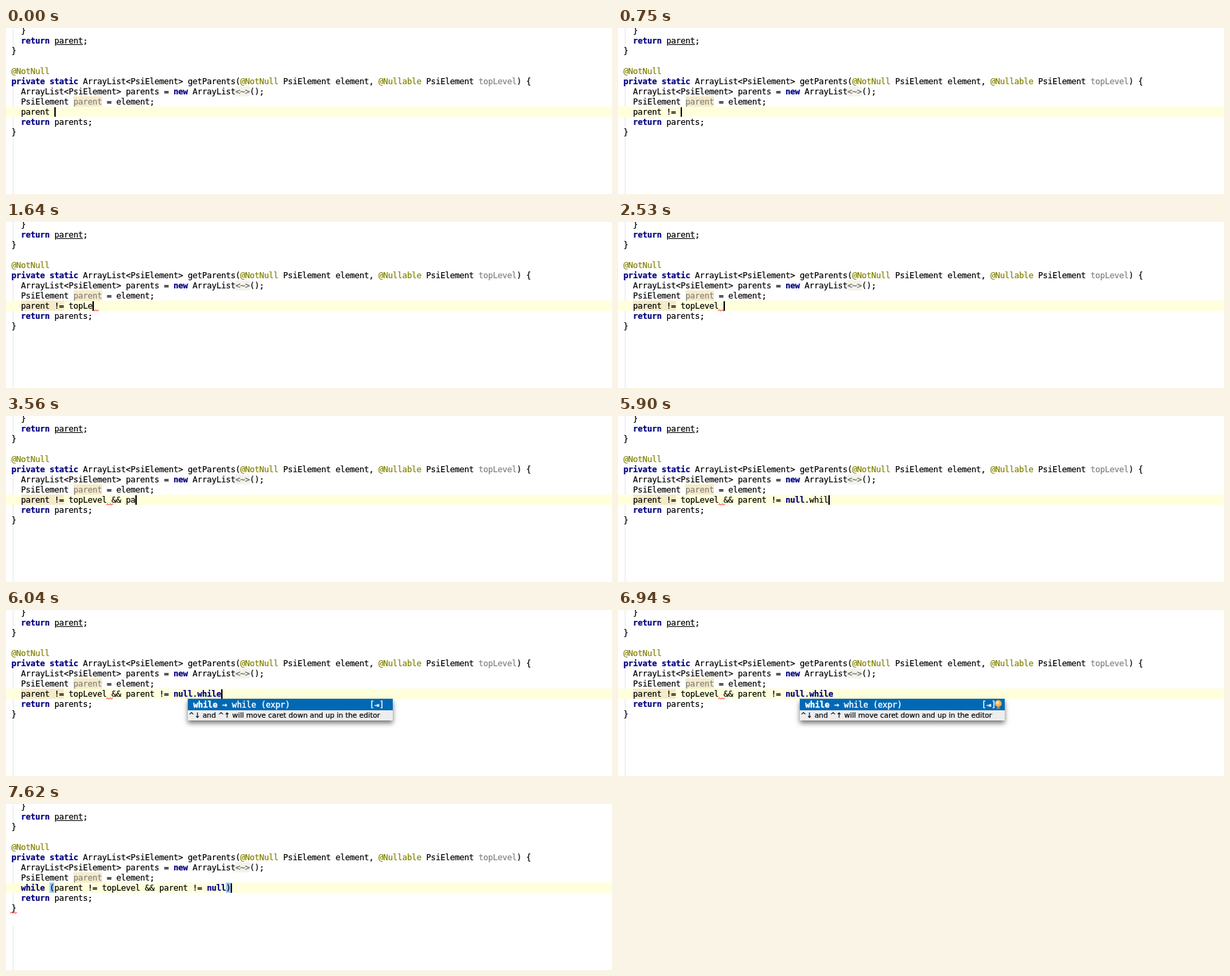
Write an HTML page that moves like this. It is 890 px wide and 245 px high and loops after 8000 ms.

```html
<!DOCTYPE html>
<html lang="en">
<head>
<meta charset="utf-8">
<style>
html, body { margin: 0; width: 100%; height: 100%; overflow: hidden; background: #fff; }
body { position: relative; color: #000; font: 12px/15px "DejaVu Sans Mono", monospace; -webkit-text-stroke: .2px; }
div, svg { position: absolute; }
.row { left: 8px; line-height: 17px; white-space: pre; letter-spacing: calc(7px - 1ch); }
.row span { display: inline-block; height: 15px; }
b { color: #000080; }
i { font-style: normal; color: #808000; }
u { text-underline-offset: 1px; }
.dim { color: #808080; }
.warn { background: #f6ebc8; }
.fold { color: #666; background: #f3f3ea; }
.pair { background: #99ccff; }
.guide { left: 10px; width: 1px; background: #e6e6e6; }
#line { left: 0; top: 116px; width: 100%; height: 15px; background: #ffffdc; }
#caret { top: 117px; width: 2px; height: 14px; background: #000; }
.wave { width: 11px; height: 3px; fill: none; stroke: #f00; }
#mark { top: 129px; }
#popup { left: 267px; top: 131px; width: 301px; height: 32px; background: #ededed; box-shadow: 0 4px 7px rgba(0,0,0,.55); }
#pick { left: 0; top: 0; width: 100%; height: 17px; line-height: 18px; background: #0068b5; color: #fff; }
#pick div { white-space: pre; letter-spacing: calc(7.1px - 1ch); -webkit-text-stroke: .4px; }
#pick b { color: #fff; }
#hint { left: 1px; top: 17px; font: 10.4px/15px "DejaVu Sans", sans-serif; white-space: pre; }
#bulb { left: 552px; top: 132px; }
</style>
</head>
<body>
<div class="guide" style="top:0;height:27px"></div>
<div class="guide" style="top:86px;height:60px"></div>
<div class="guide" id="tail" style="bottom:0"></div>
<div id="line"></div>
<svg class="wave" id="mark"><path id="zigzag" d="M0 2.5L2 .5L4 2.5L6 .5L8 2.5L10 .5"/></svg>
<svg class="wave" id="end" style="left:6px;top:159px"><use href="#zigzag"/></svg>
<div id="caret"></div>
<div id="popup">
  <div id="pick"><div style="left:8px"><b>while</b> → while (expr)</div><div style="left:267px">[⇥]</div></div>
  <div id="hint">^↓ and ^↑ will move caret down and up in the editor</div>
</div>
<svg id="bulb" width="13" height="16">
  <circle cx="6.5" cy="6" r="5" fill="#f5b04c"/><circle cx="5.5" cy="5" r="2.5" fill="#ffdc96"/>
  <path d="M4.5 11h4v3h-4z" fill="#8b8b8b"/>
</svg>
<script>
const $ = id => document.getElementById(id);
const rows = [
  '  }',
  '  <b>return</b> <u>parent</u>;',
  '}',
  '',
  '<i>@NotNull</i>',
  '<b>private static</b> ArrayList&lt;PsiElement> getParents(<i>@NotNull</i> PsiElement element, <i>@Nullable</i> PsiElement <span class="dim">topLevel</span>) {',
  '  ArrayList&lt;PsiElement> parents = <b>new</b> ArrayList<span class="fold">&lt;~></span>();',
  '  PsiElement <span class="dim warn">parent</span> = element;',
  '',
  '  <b>return</b> parents;',
  '}'
].map((html, n) => {
  const row = document.createElement('div');
  row.className = 'row';
  row.style.top = n * 15 - 4 + 'px';
  row.innerHTML = html;
  document.body.insertBefore(row, $('mark'));
  return row;
});

// What is typed on each beat; an empty beat is a pause.
const beats = 'parent |!||=|| |t||o|p||Le||ve|l| ||||&|&|| |p|a|r|e|n|t| |!=| |n||ul|l||.w|h|i|l|e'.split('|');
const beatMs = 147.2, blinkAt = 6940, expandAt = 7210, errorAt = 7620;
const popupAt = (beats.length - 1) * beatMs;
const loop = 'while (parent != topLevel && parent != null)';

const show = (id, on) => $(id).style.display = on ? '' : 'none';
const colour = s => s.replace(/&/g, '&amp;').replace(/\b(null|while)\b/g, '<b>$1</b>');
const wrap = (name, s) => `<span class="${name}">${s}</span>`;

function draw(t) {
  const done = t >= expandAt;
  const beat = Math.floor(t / beatMs);
  const code = done ? loop : beats.slice(0, beat + 1).join('');
  let html = colour(code);
  if (done) html = html.replace(/[()]/g, s => wrap('pair', s));
  else if (beat > 5) html = html.replace('parent !=', s => wrap('warn', s));
  rows[8].innerHTML = '  ' + html;

  // The error mark follows the word being typed, then stays behind it.
  const settled = beat >= 17;
  const col = settled ? 'parent != topLevel'.length : code.length;
  $('mark').style.left = 21 + col * 7 + 'px';
  show('mark', !done && (settled || beat >= 9 && beat < 13));

  $('caret').style.left = 22 + code.length * 7 + 'px';
  show('caret', t < blinkAt || done);
  show('popup', t >= popupAt && !done);
  show('bulb', t >= blinkAt && !done);
  show('end', t >= errorAt);
  $('tail').style.top = done ? '180px' : '163px';
}

const start = performance.now();
function tick() {
  draw((performance.now() - start) % 8000);
  requestAnimationFrame(tick);
}
tick();
</script>
</body>
</html>
```
